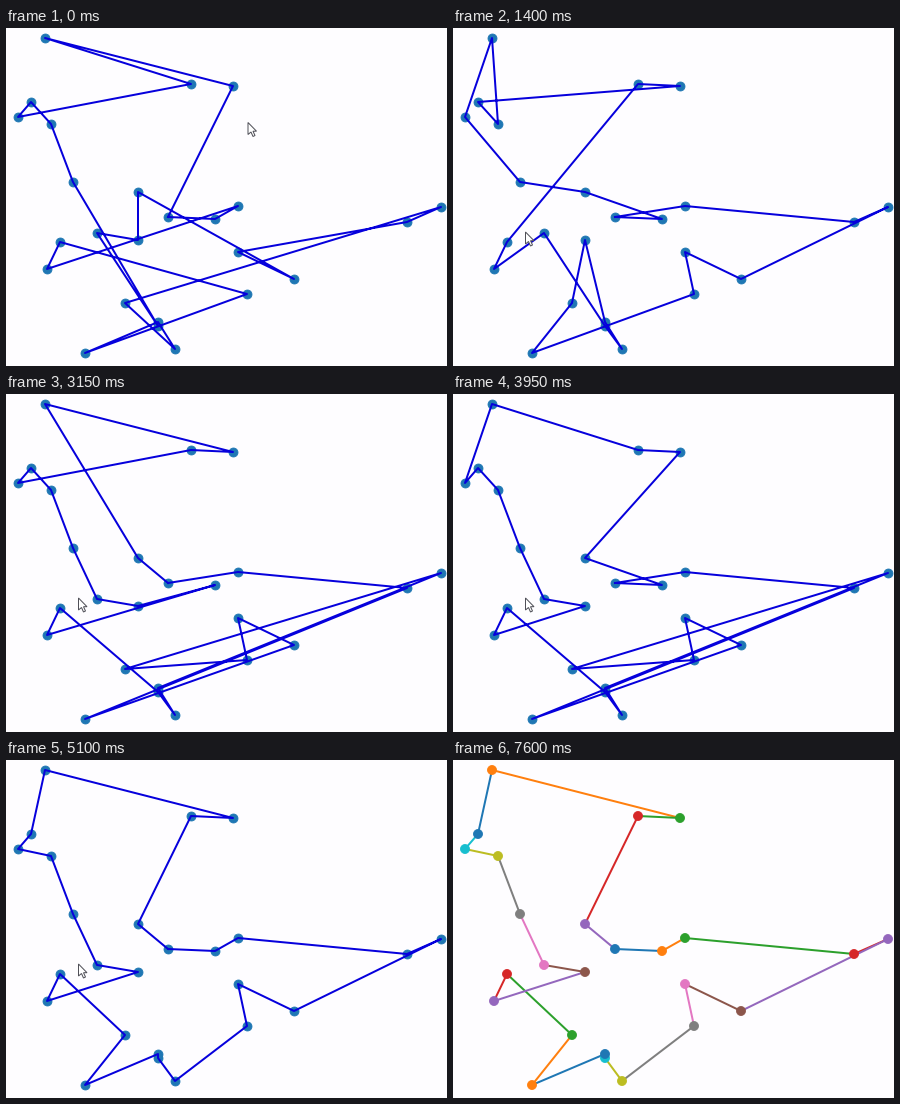
Write a matplotlib script that moves like this. It is 441x338 px and loops after 7.65 s.

```python
import numpy as np
import matplotlib.pyplot as plt
from matplotlib.animation import FuncAnimation

W, H, DPI = 441, 338, 100
PX = 72 / DPI
FRAMES, STEP_MS = 153, 50
SOLVED_AT = 124
STAGE, REST = 25.5, 3      # frames per search stage, pause at each end
BLUE = "#0600dc"

# Cities a..y, listed along the best tour
CITIES = np.array([
    (162, 189), (209, 191), (232, 178), (401, 194), (435, 179),
    (288, 251), (232, 224), (241, 266), (169, 321), (152, 298),
    (152, 294), (79, 325), (119, 275), (54, 214), (41, 241),
    (132, 212), (91, 205), (67, 154), (45, 96), (12, 89),
    (25, 74), (39, 10), (227, 58), (185, 56), (132, 164)])

# Tours the search passes through, worst to best
TOURS = ["awvxtusrjqpyfgdemiklhnocb", "acdefghlmpkijqonxwusvtryb",
         "acdefbghlkijmnopqrsutxwvy", "acdlfghmekijnopqrsutvxwyb",
         "abcdefghijklmnopqrstuvwxy"]


def reversals(start, goal):
    """Tours leading from start to goal, one segment reversal at a time."""
    path = [start]
    for i, city in enumerate(goal):
        tour = path[-1]
        j = tour.index(city)
        if j > i:
            path.append(tour[:i] + tour[i:j + 1][::-1] + tour[j + 1:])
    return path


PATHS = [reversals(a, b) for a, b in zip(TOURS, TOURS[1:])]


def tour_at(frame):
    stage, u = divmod(frame, STAGE)
    if stage >= len(PATHS):
        return TOURS[-1]
    path = PATHS[int(stage)]
    t = np.clip((u - REST) / (STAGE - 2 * REST - 1), 0, 1)
    return path[int(t * (len(path) - 1))]


def route(tour):
    return CITIES[[ord(c) - ord("a") for c in tour + tour[0]]]


def smooth(t):
    t = np.clip(t, 0, 1)
    return t * t * (3 - 2 * t)


fig = plt.figure(figsize=(W / DPI, H / DPI), dpi=DPI, facecolor="#fefdff")
ax = fig.add_axes([0, 0, 1, 1])
ax.set(xlim=(0, W), ylim=(H, 0))
ax.axis("off")


def draw_dots(points, color, z):
    return ax.scatter(*points.T, s=(9 * PX) ** 2, color=color,
                      linewidths=0.8 * PX, zorder=z)


def draw_line(points, color):
    return ax.plot(*points.T, color=color, lw=2 * PX, zorder=2)[0]


dots = draw_dots(CITIES, "C0", 1)
line = draw_line(route(TOURS[0]), BLUE)

# Solved view: each leg shares the colour of its first city
n = len(CITIES)
colors = [f"C{i % 10}" for i in range(n)]
legs = [draw_line(CITIES[[i, (i + 1) % n]], c) for i, c in enumerate(colors)]
legs.append(draw_dots(CITIES, colors, 3))

ARROW = np.array([(0, 0), (0, 12), (3, 9.5), (5, 14), (7, 13), (5, 8.7), (8.5, 8.7)])
pointer, = ax.fill(*ARROW.T, fc="white", ec="#505058", lw=PX, zorder=5)
POINTER_FROM, POINTER_TO = np.array([(242, 94.5), (72.5, 204)])


def update(frame):
    solved = frame >= SOLVED_AT
    for leg in legs:
        leg.set_visible(solved)
    for part in (dots, line, pointer):
        part.set_visible(not solved)
    line.set_data(*route(tour_at(frame)).T)
    k = smooth((frame - 4) / 14)
    pointer.set_xy(ARROW + POINTER_FROM + k * (POINTER_TO - POINTER_FROM))
    return [dots, line, pointer, *legs]


anim = FuncAnimation(fig, update, frames=FRAMES, interval=STEP_MS,
                     repeat=True, repeat_delay=0, blit=False)
plt.show()
```
